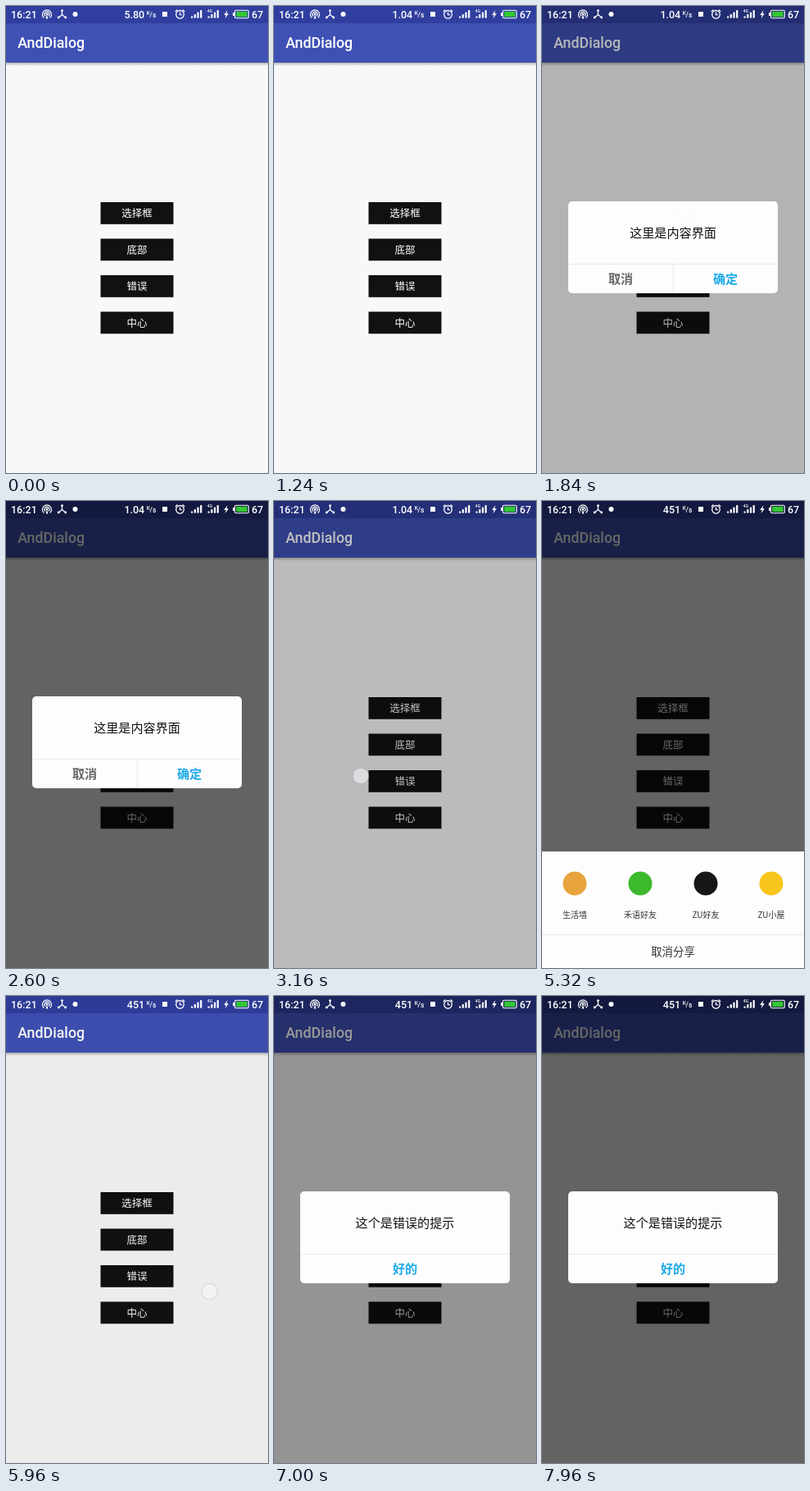
Animation of 320 by 569 pixels, one loop 8000 ms. Source, as an HTML page:

```html
<!DOCTYPE html>
<html lang="zh-CN">
<head>
<meta charset="utf-8">
<title>AndDialog</title>
<style>
  html, body { margin: 0; width: 100%; height: 100%; overflow: hidden; background: #f8f8f9; }
  svg { display: block; width: 100vw; height: 100vh; }
  text { font-family: "Noto Sans CJK SC", "Noto Sans CJK", sans-serif; }
  .roboto { font-family: Roboto, sans-serif; font-weight: 500; fill: #fff; }
  .line { fill: none; stroke: #fff; stroke-width: 1.3; }
  .popup { transform-box: fill-box; transform-origin: center; }
  .popup, #sheet, #dim, .touch, .speed { opacity: 0; }
</style>
</head>
<body>
<svg viewBox="0 0 320 569" preserveAspectRatio="none">
  <defs>
    <linearGradient id="shade" x2="0" y2="1">
      <stop stop-color="#000" stop-opacity=".28"/>
      <stop offset="1" stop-color="#000" stop-opacity="0"/>
    </linearGradient>
  </defs>
  <rect width="320" height="569" fill="#f8f8f9"/>
  <rect y="69" width="320" height="4" fill="url(#shade)"/>
  <rect width="320" height="69" fill="#3f51b5"/>
  <rect width="320" height="21" fill="#303f9f"/>
  <text class="roboto" x="14.2" y="51.3" font-size="17.8">AndDialog</text>
  <g id="buttons"></g>
  <rect id="dim" width="320" height="569"/>

  <g id="status">
    <text class="roboto" x="6" y="14.6" font-size="12.5">16:21</text>
    <g class="line">
      <path d="M46.4 14.6A5.5 5.5 0 1 1 53.6 14.6M48 12.4A3 3 0 1 1 52 12.4"/>
      <path d="M68.5 5v5.5M68.5 10.5L64.5 14M68.5 10.5L72.5 14"/>
      <circle cx="212.5" cy="10.3" r="4.8"/>
      <path d="M212.5 7.5v3.2h2.4M206.8 7l2.6-2.4M218.2 7l-2.6-2.4"/>
      <rect x="279.5" y="5.2" width="16.8" height="9.6" rx="1.5" stroke-width="1.1"/>
    </g>
    <g fill="#fff">
      <path d="M48.7 15.5L50 9.5L51.3 15.5z"/>
      <circle cx="50" cy="10" r="1.4"/>
      <circle cx="68.5" cy="5.6" r="1.4"/>
      <circle cx="64.2" cy="14" r="1.4"/>
      <circle cx="72.8" cy="14" r="1.4"/>
      <circle cx="84.5" cy="10" r="3"/>
      <rect x="191" y="7" width="6" height="6"/>
      <path d="M270.5 5l-4.3 6h2.5l-1.2 4.2 4.4-6h-2.5z"/>
      <rect x="277" y="8" width="2" height="4"/>
    </g>
    <rect x="281.2" y="6.8" width="13.4" height="6.4" fill="#32c832"/>
    <text class="roboto" x="171.8" y="10.8" font-size="6.5">K</text>
    <text class="roboto" x="175.6" y="14" font-size="8.5">/s</text>
    <text class="roboto" x="245.8" y="8.3" font-size="5">4G</text>
    <text class="roboto" x="300" y="14.6" font-size="12.5">67</text>
  </g>
  <g id="popups"></g>
  <g id="sheet">
    <rect y="427" width="320" height="142" fill="#fdfdfd"/>
    <path d="M0 528.5H320" stroke="#e8e8e8"/>
  </g>
  <g id="touches"></g>
</svg>

<script>
const LOOP = 8000, FADE = 240;
const $ = id => document.getElementById(id);

function add(parent, tag, attrs, content) {
  const el = document.createElementNS("http://www.w3.org/2000/svg", tag);
  for (const name in attrs) el.setAttribute(name, attrs[name]);
  if (content) el.textContent = content;
  return parent.appendChild(el);
}

// Text centred on a point.
const label = (parent, str, x, y, size, fill, weight = 400) =>
  add(parent, "text", { x, y: y + size * .37, "font-size": size, fill,
    "font-weight": weight, "text-anchor": "middle" }, str);

// steps: [time, value, easing to the next step]
function track(el, prop, steps) {
  const first = steps[0], last = steps[steps.length - 1];
  const frames = [[0, first[1]], ...steps, [LOOP, last[1]]];
  el.animate(frames.map(([time, value, easing = "linear"]) =>
    ({ offset: time / LOOP, [prop]: value, easing })),
    { duration: LOOP, iterations: Infinity });
}

["选择框", "底部", "错误", "中心"].forEach((name, i) => {
  const y = 239 + i * 44.5;
  add($("buttons"), "rect", { x: 115.5, y, width: 89, height: 26.8, fill: "#111" });
  label($("buttons"), name, 160, y + 13.4, 12.5, "#fff");
});

for (const x of [226, 246.5])
  for (let i = 0; i < 4; i++) {
    const h = 2 + i * 2.5;
    add($("status"), "rect", { x: x + i * 3.7, y: 14.6 - h, width: 2.2, height: h, fill: "#fff" });
  }

function popup(message, actions) {
  const g = add($("popups"), "g", { class: "popup" });
  add(g, "rect", { x: 32, y: 238, width: 256, height: 112, rx: 5, fill: "#fdfdfd" });
  add(g, "path", { d: "M32 314.5H288" + (actions.length > 1 ? "M160 315V350" : ""), stroke: "#ebebeb" });
  label(g, message, 160, 276.5, 15.1, "#111");
  const width = 256 / actions.length;
  actions.forEach(([name, fill], i) => label(g, name, 32 + width * (i + .5), 332.5, 15.1, fill, 700));
  return g;
}
const blue = "#1ca9e9";
const confirmBox = popup("这里是内容界面", [["取消", "#666"], ["确定", blue]]);
const errorBox = popup("这个是错误的提示", [["好的", blue]]);

[["生活墙", "#e8a33d"], ["禾语好友", "#3cb92d"], ["ZU好友", "#161616"], ["ZU小屋", "#f8c51c"]]
  .forEach(([name, fill], i) => {
    const x = 40 + i * 80;
    add($("sheet"), "circle", { cx: x, cy: 466, r: 14.5, fill });
    label($("sheet"), name, x, 504, 10, "#333");
  });
label($("sheet"), "取消分享", 160, 549, 13.4, "#333");

// Network speed: [text, from, to]
[["5.80", 0, 1200], ["1.04", 1200, 4640], ["451", 4640, LOOP]].forEach(([str, from, to]) => {
  const el = add($("status"), "text", { class: "roboto speed", x: 169.2, y: 14.6,
    "font-size": 12.5, "text-anchor": "end" }, str);
  track(el, "opacity", [[from, 0], [from, 1], [to, 1], [to, 0]]);
});

// Touches: [x, y, down, up]
[[176, 252, 1540, 1700], [106, 335, 2860, 3160], [180.5, 298, 4000, 4920],
 [248.5, 360, 5700, 5920], [180, 342, 6580, 6800]].forEach(([cx, cy, down, up]) => {
  const el = add($("touches"), "circle", { class: "touch", cx, cy, r: 9.7,
    fill: "#fff", "fill-opacity": .5, stroke: "#8c8cbe", "stroke-opacity": .4 });
  track(el, "opacity", [[down, 0], [down + 40, 1], [up, 1], [up + 160, 0]]);
});

const SHADE = .6;
const rise = from => [[from, 0], [from + FADE, SHADE]];
const fall = from => [[from, SHADE], [from + FADE, 0]];
track($("dim"), "opacity", [...rise(1730), ...fall(3020), ...rise(5080), ...fall(5740), ...rise(6840)]);

const show = from => [[from, 0, "ease-out"], [from + 100, 1]];
const grow = from => [[from, "scale(.92)", "ease-out"], [from + 110, "scale(1)"]];
track(confirmBox, "opacity", [...show(1730), [3020, 1], [3130, 0]]);
track(confirmBox, "transform", grow(1730));
track(errorBox, "opacity", show(6840));
track(errorBox, "transform", grow(6840));

const below = "translateY(142px)", rest = "translateY(0px)";
track($("sheet"), "opacity", [[5080, 0], [5080, 1], [5940, 1], [5940, 0]]);
track($("sheet"), "transform", [[5080, below, "ease-out"], [5300, rest], [5740, rest, "ease-in"], [5940, below]]);
</script>
</body>
</html>
```
